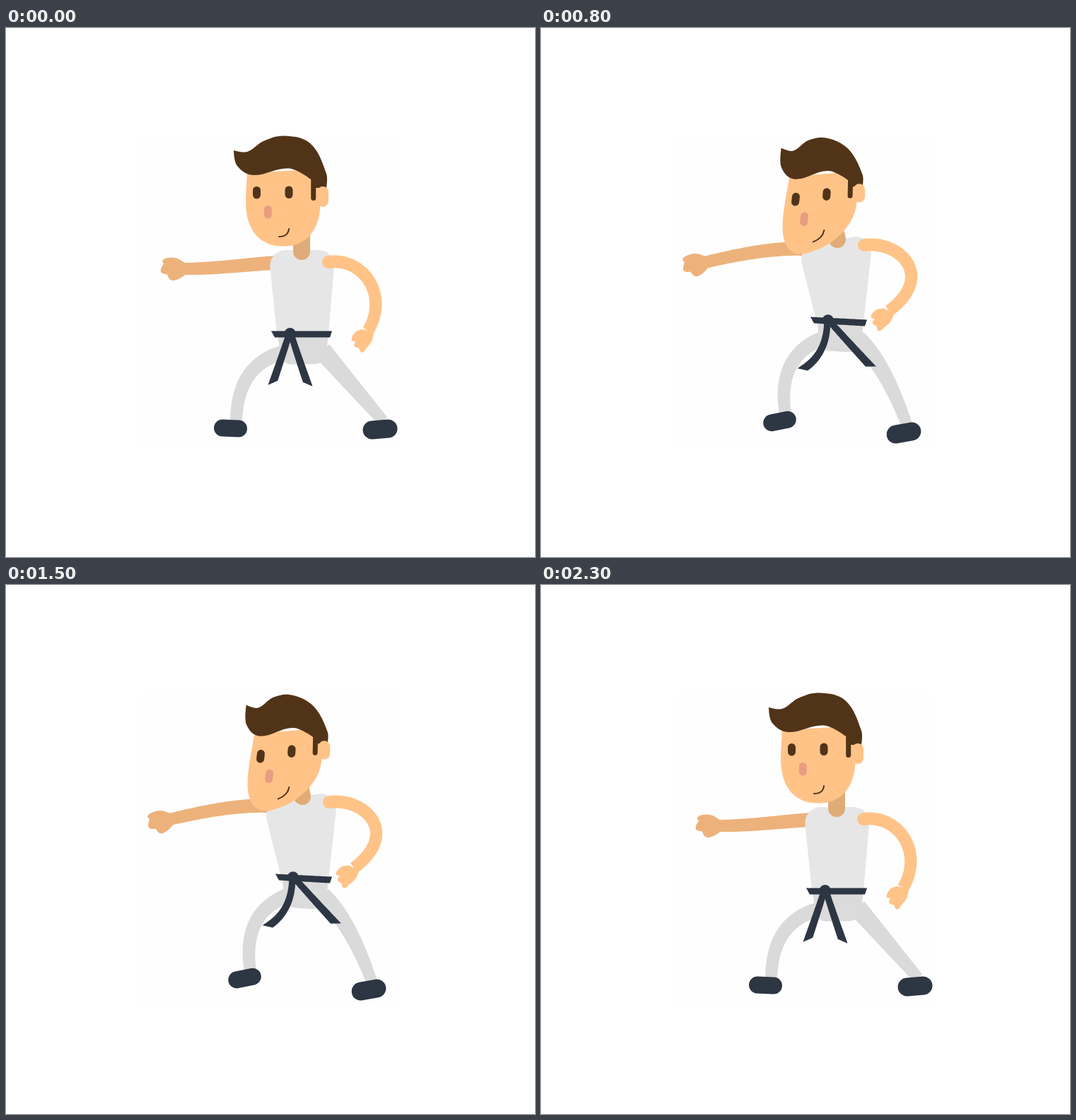
An HTML page with a canvas that plays this animation: 748 px wide and 748 px high, repeating every 2.4 s.

```html
<!DOCTYPE html>
<html lang="en">
<head>
<meta charset="utf-8">
<title>Punch practice</title>
<style>
html, body { margin: 0; width: 100%; height: 100%; overflow: hidden; background: #fff; }
canvas { display: block; }
</style>
</head>
<body>
<canvas id="stage" width="748" height="748"></canvas>
<script>
const ctx = document.getElementById('stage').getContext('2d');

const SKIN = '#ffc388', SHADE = '#edb27b', NECK = '#dfab76', HAIR = '#513418',
  NOSE = '#e99c7f', SHIRT = '#e6e6e6', HIPS = '#dbdbdb', TROUSERS = '#dadada', DARK = '#2d3643';

// Shapes drawn once and carried along by the poses.
const hairLine = [322, 173, 341, 175, 364, 160, 393, 152.5, 430, 163, 453, 206, 453, 226,
  438, 226, 431, 214, 400, 198.5, 349, 208, 327, 195];
const fist = [4, -9, -7, -15, -21, -15, -27, -11, -25, -7, -29, 1, -28, 6, -20, 8, -15, 16, -5, 15, 5, 9];
const hand = [-8, 0, -17, 7, -19, 19, -13, 19, -13, 26, -6, 27, 0, 32, 4, 25, 9, 12, 8, 0];

// Key poses. head: eye centre, x axis, y axis, twist per 1000 px². Shoes: x, y, tilt.
const punch = {
  head: [377.2, 232.5, 1, 0, 0, 1, 0, 0],
  neck: [418, 295, 418, 316],
  torso: [371, 314, 466, 314],
  belt: [375, 433, 461, 433],
  tails: [390, 465, 379, 497, 425, 499],
  backArm: [380, 332, 335, 335, 290, 341, 248, 340.5],
  frontArm: [456, 331, 505, 324, 542, 378, 512, 428],
  knees: [327, 476, 490, 506],
  shoeL: [317.5, 566, 0.04],
  shoeR: [529, 567.5, -0.08]
};
const reach = {
  head: [381.9, 238.7, 0.963, -0.143, -0.104, 1.075, 1.5, -4],
  neck: [416, 285, 419, 299],
  torso: [363, 310, 470, 290],
  belt: [381, 413, 461, 417],
  tails: [405, 458, 374, 480, 463, 475],
  backArm: [372, 312, 325, 311, 275, 321, 229, 332],
  frontArm: [457, 307, 506, 300, 559, 350, 492, 400],
  knees: [333, 464, 486, 474],
  shoeL: [337.5, 556, -0.2],
  shoeR: [513, 572.5, -0.18]
};
const guard = {
  head: [339.8, 254, 1.02, -0.044, -0.05, 1.053, 2.2, -3.9],
  neck: [393, 306, 412, 325],
  torso: [379, 329, 472, 321],
  belt: [378, 419, 467, 423.5],
  tails: [403, 464, 372, 483, 468, 483],
  backArm: [388, 350, 350, 396, 312, 405, 277, 361],
  frontArm: [457, 337, 500, 349, 535, 380, 531, 439],
  knees: [342, 484, 497, 478],
  shoeL: [336.5, 567.5, -0.11],
  shoeR: [519.5, 581.5, -0.16]
};

function mix(a, b, k) {
  const pose = {};
  for (const part in a) pose[part] = a[part].map((v, i) => v + (b[part][i] - v) * k);
  return pose;
}

// The body leans in faster than the head follows.
const lean = mix(punch, reach, 0.7);
lean.head = [377.7, 239.4, 0.989, -0.103, -0.067, 1.075, 1.3, -3.3];
const poses = [punch, lean, mix(lean, reach, 0.5), reach, mix(reach, guard, 0.5), guard];

function fill(color) {
  ctx.fillStyle = color;
  ctx.fill();
}

// Closed smooth outline; listed point indices stay sharp.
function blob(list, color, corners = []) {
  const n = list.length / 2;
  const at = i => { const k = (i + n) % n; return [list[2 * k], list[2 * k + 1]]; };
  const handle = (i, dir) => {
    const p = at(i);
    if (corners.includes((i + n) % n)) return p;
    const a = at(i - 1), b = at(i + 1), q = at(i + dir);
    const len = Math.hypot(b[0] - a[0], b[1] - a[1]) || 1;
    const k = dir * 0.35 * Math.hypot(q[0] - p[0], q[1] - p[1]) / len;
    return [p[0] + (b[0] - a[0]) * k, p[1] + (b[1] - a[1]) * k];
  };
  ctx.beginPath();
  ctx.moveTo(...at(0));
  for (let i = 0; i < n; i++) {
    ctx.bezierCurveTo(...handle(i, 1), ...handle(i + 1, -1), ...at(i + 1));
  }
  fill(color);
}

// Tapered strip along a cubic; tip 1 or -1 makes one side end in a point.
function limb([x0, y0, x1, y1, x2, y2, x3, y3], w0, w1, color, tip = 0) {
  const near = [], far = [];
  for (let i = 0; i <= 30; i++) {
    const t = i / 30, u = 1 - t;
    const pos = (a, b, c, d) => u * u * u * a + 3 * u * u * t * b + 3 * u * t * t * c + t * t * t * d;
    const vel = (a, b, c, d) => u * u * (b - a) + 2 * u * t * (c - b) + t * t * (d - c);
    const x = pos(x0, x1, x2, x3), y = pos(y0, y1, y2, y3);
    const dx = vel(x0, x1, x2, x3), dy = vel(y0, y1, y2, y3), len = Math.hypot(dx, dy);
    const k = (w0 + (w1 - w0) * t) / 2 / len;
    const ahead = i === 30 ? 10 / len : 0;
    const a = tip > 0 ? ahead : 0, b = tip < 0 ? ahead : 0;
    near.push([x - dy * k + dx * a, y + dx * k + dy * a]);
    far.unshift([x + dy * k + dx * b, y - dx * k + dy * b]);
  }
  ctx.beginPath();
  near.concat(far).forEach(p => ctx.lineTo(...p));
  fill(color);
}

// Cubic with a single bend point.
function bend(x0, y0, qx, qy, x1, y1) {
  const near = (a, q) => a + (q - a) * 2 / 3;
  return [x0, y0, near(x0, qx), near(y0, qy), near(x1, qx), near(y1, qy), x1, y1];
}

function disc(x, y, r, color) {
  ctx.beginPath();
  ctx.arc(x, y, r, 0, 2 * Math.PI);
  fill(color);
}

function pill([x0, y0, x1, y1], width, color) {
  ctx.beginPath();
  ctx.moveTo(x0, y0);
  ctx.lineTo(x1, y1);
  ctx.lineWidth = width;
  ctx.strokeStyle = color;
  ctx.stroke();
}

// Four-sided shape whose two middle corners are round.
function block(x0, y0, x1, y1, x2, y2, x3, y3, r, color) {
  ctx.beginPath();
  ctx.moveTo(x0, y0);
  ctx.arcTo(x1, y1, x2, y2, r);
  ctx.arcTo(x2, y2, x3, y3, r);
  ctx.lineTo(x3, y3);
  fill(color);
}

// Puts a shape at the end of an arm, turned with the forearm.
function attach(arm, shape, rest, follow, color, corners) {
  const [ex, ey, x, y] = arm.slice(4);
  const turn = Math.atan2(y - ey, x - ex) - rest;
  ctx.save();
  ctx.translate(x, y);
  ctx.rotate(Math.atan2(Math.sin(turn), Math.cos(turn)) * follow);
  blob(shape, color, corners);
  ctx.restore();
}

function shoe([x, y, tilt], size) {
  const dx = 11.5 * Math.cos(tilt), dy = 11.5 * Math.sin(tilt);
  pill([x - dx, y - dy, x + dx, y + dy], size, DARK);
}

function drawHead([ox, oy, xx, xy, yx, yy, tx, ty]) {
  const warp = list => {
    const out = [];
    for (let i = 0; i < list.length; i += 2) {
      const x = list[i] - 377.2, y = list[i + 1] - 232.5, w = x * y / 1000;
      out.push(ox + x * xx + y * yx + w * tx, oy + x * xy + y * yy + w * ty);
    }
    return out;
  };
  const mark = (x0, y0, x1, y1, width, color) => pill(warp([x0, y0, x1, y1]), width, color);

  // Jaw: lower half of a superellipse under straight sides.
  const face = [437, 200, 444, 222];
  for (let i = 0; i <= 16; i++) {
    const a = Math.PI * i / 16, c = Math.cos(a);
    face.push(391.8 + 52.7 * Math.sign(c) * Math.abs(c) ** 0.87, 245 + 63.5 * Math.abs(Math.sin(a)) ** 0.87);
  }
  face.push(341, 205);
  blob(warp(face), SKIN, [0, face.length / 2 - 1]);
  blob(warp(hairLine), HAIR, [0, 6, 7, 8]);
  mark(434.7, 216, 434.7, 240.5, 7, HAIR);
  mark(448, 232, 448, 245, 16, SKIN);
  mark(354.5, 229.5, 354.5, 236, 11, HAIR);
  mark(400, 229, 400, 235.5, 11, HAIR);
  mark(370.3, 256.5, 370.3, 264, 11, NOSE);

  const [x0, y0, cx, cy, x1, y1] = warp([386, 295, 399, 295, 400, 284]);
  ctx.beginPath();
  ctx.moveTo(x0, y0);
  ctx.quadraticCurveTo(cx, cy, x1, y1);
  ctx.lineWidth = 2;
  ctx.strokeStyle = HAIR;
  ctx.stroke();
}

function drawBelt([lx, ly, rx, ry], [cx, cy, ax, ay, bx, by]) {
  const kx = lx + (rx - lx) * 0.31, ky = ly + (ry - ly) * 0.31 - 1;
  blob([lx, ly - 4.5, rx, ry - 4.5, rx - 3, ry + 4.5, lx + 5, ly + 4.5], DARK, [0, 1, 2, 3]);
  limb(bend(kx - 1, ky, cx, cy, ax, ay), 9, 11, DARK, 1);
  limb(bend(kx + 1, ky, (kx + bx) / 2, (ky + by) / 2, bx, by), 9, 11, DARK, -1);
  disc(kx, ky, 8, DARK);
}

function draw(p) {
  const [lx, ly, rx, ry] = p.belt, [ax, ay, bx, by] = p.torso;
  const [kx, ky, jx, jy] = p.knees;
  ctx.fillStyle = '#fff';
  ctx.fillRect(0, 0, 748, 748);
  ctx.fillStyle = '#fefefe';
  ctx.fillRect(193, 153, 359, 442);

  limb(p.backArm, 20, 17, SHADE);
  attach(p.backArm, fist, Math.PI, 1, SHADE, [0, 4, 7, 10]);

  limb(bend(lx + 17, ly + 26, kx, ky, p.shoeL[0] + 8, p.shoeL[1] - 10), 21, 17, TROUSERS);
  limb(bend(rx - 14, ry + 23, jx, jy, p.shoeR[0] + 4, p.shoeR[1] - 12), 27, 16, TROUSERS);
  shoe(p.shoeL, 24);
  shoe(p.shoeR, 26);

  block(lx + 9, ly, lx + 15, ly + 43, rx - 10, ry + 42, rx - 5, ry, 16, HIPS);
  block(lx + 8, ly, ax, ay, bx, by, rx - 5, ry, 22, SHIRT);
  pill(p.neck, 24, NECK);
  drawHead(p.head);
  drawBelt(p.belt, p.tails);

  limb(p.frontArm, 18, 17, SKIN);
  disc(p.frontArm[0], p.frontArm[1], 9, SKIN);
  attach(p.frontArm, hand, Math.PI / 2, 0.5, SKIN, [0, 3, 5, 9]);
}

ctx.lineCap = 'round';
const start = performance.now();

// Six poses out and back, one every 100 ms.
function tick() {
  const step = Math.floor((performance.now() - start) / 100) % 12;
  draw(poses[step < 6 ? step : 11 - step]);
  requestAnimationFrame(tick);
}
tick();
</script>
</body>
</html>
```
